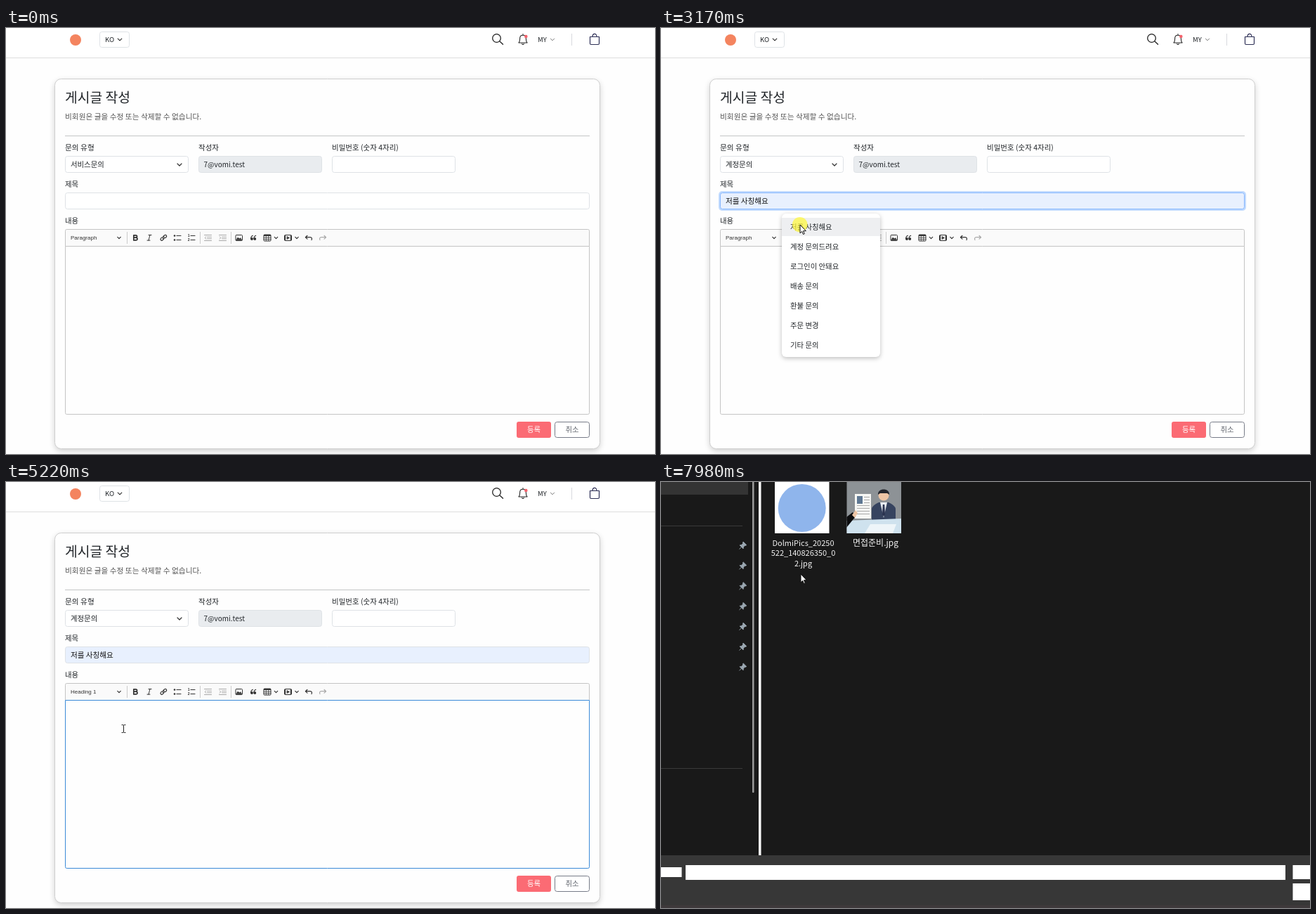
These frames come from a looping animation (924x606 px, 8000 ms). An HTML page with a canvas:

```html
<!DOCTYPE html>
<html lang="ko">
<head>
<meta charset="utf-8">
<title>게시글 작성</title>
<style>
html, body { margin: 0; width: 100%; height: 100%; overflow: hidden; background: #fefefe; }
canvas { display: block; }
</style>
</head>
<body>
<canvas id="stage" width="924" height="606"></canvas>
<script>
const c = document.getElementById('stage').getContext('2d');
const LOOP = 8000;
const KR = '"Noto Sans CJK KR", "Noto Sans CJK JP", "Noto Sans CJK", "Noto Sans", sans-serif';
const ARIAL = '"Liberation Sans", Arial, sans-serif';
const INK = '#212529', DARK = '#333', PALE = '#aaa', BORDER = '#dee2e6';

// Screen refreshes: start, end, count
const BEATS = [
  [390, 1160, 12], [1220, 1630, 7], [1890, 1890, 1], [2040, 2830, 12],
  [2900, 3030, 3], [3170, 3900, 11], [4030, 4750, 11], [4880, 5640, 11],
  [5690, 5970, 4], [6170, 6910, 11], [6980, 6980, 1], [7120, 7910, 11], [7980, 7980, 1]
];
// Pointer stops: time, x, y
const PATH = [
  [390, 886, 590], [1160, 213, 199], [1360, 213, 199], [1600, 190.5, 236],
  [2060, 190.5, 236], [2330, 188.5, 244.5], [2580, 188.5, 244.5], [2830, 196, 272],
  [3030, 198, 280], [3220, 198, 280], [3570, 141, 304], [4100, 141, 304],
  [4330, 138, 333], [4480, 138, 333], [4740, 167, 351], [6150, 167, 351],
  [6620, 340, 286], [6840, 331, 298], [7130, 331, 298], [7590, 327, 261],
  [7680, 327, 261], [7980, 199, 131]
];
const CLICKS = [[1220, 1360], [1890, 2060], [2400, 2600], [3170, 3280], [4030, 4130], [4440, 4540], [7120, 7260]];
const TYPED = ['ㄷ', '도', '동', '도오', '도와', '도왖', '도와주', '도와줏', '도와주세', '도와주셍', '도와주세요'];
const SUBJECT = '저를 사칭해요';

const clamp = v => Math.max(0, Math.min(1, v));
const within = (t, a, b) => t >= a && t < b;
const inBox = (p, x, y, w, h) => p.x >= x && p.x <= x + w && p.y >= y && p.y <= y + h;
const blink = (t, from) => Math.floor((t - from) / 530) % 2 === 0;
const fade = (t, on, off) => clamp((t - on) / 120 + .4) * clamp(1 - (t - off) / 150) * (t >= on);

function held(t) {
  let h = 0;
  for (const [a, b, n] of BEATS) {
    if (t < a) break;
    const d = n > 1 ? (b - a) / (n - 1) : 1;
    h = a + Math.min(n - 1, Math.floor((t - a + 25) / d)) * d;
  }
  return h;
}

function pointer(t) {
  const i = PATH.findIndex(k => k[0] > t);
  if (i < 0) return { x: PATH.at(-1)[1], y: PATH.at(-1)[2] };
  const a = PATH[Math.max(0, i - 1)], b = PATH[i];
  const u = clamp((t - a[0]) / (b[0] - a[0])), e = u * u * (3 - 2 * u);
  return { x: a[1] + (b[1] - a[1]) * e, y: a[2] + (b[2] - a[2]) * e };
}

function rect(x, y, w, h, fill) { c.fillStyle = fill; c.fillRect(x, y, w, h); }

function box(x, y, w, h, r, fill, stroke) {
  c.beginPath();
  c.roundRect(x, y, w, h, r);
  if (fill) { c.fillStyle = fill; c.fill(); }
  if (stroke) { c.strokeStyle = stroke; c.lineWidth = 1; c.stroke(); }
}

function dot(x, y, r, fill) {
  c.beginPath();
  c.arc(x, y, r, 0, 7);
  c.fillStyle = fill;
  c.fill();
}

function path(d, x, y, stroke, width = 1, fill) {
  const p = new Path2D(d);
  c.save();
  c.translate(x, y);
  c.lineCap = c.lineJoin = 'round';
  if (fill) { c.fillStyle = fill; c.fill(p); }
  if (stroke) { c.strokeStyle = stroke; c.lineWidth = width; c.stroke(p); }
  c.restore();
}

function text(s, x, mid, size, color = INK, { font = KR, weight = 400, align = 'left' } = {}) {
  c.font = `${weight} ${size}px ${font}`;
  c.textAlign = align;
  c.fillStyle = color;
  c.fillText(s, x, mid + size * .37);
}

const chevron = (x, y, r = 2.8, color = DARK, w = 1.2) =>
  path(`M${-r} ${-r / 2}L0 ${r / 2}L${r} ${-r / 2}`, x, y, color, w);

function shadowed(blur, dy, color, draw) {
  c.save();
  c.shadowBlur = blur;
  c.shadowOffsetY = dy;
  c.shadowColor = color;
  draw();
  c.restore();
}

function field(x, y, w, h, fill, focus) {
  if (focus > 0) {
    c.globalAlpha = focus;
    box(x - 2.5, y - 2.5, w + 5, h + 5, 5, '#c2dbfe');
    c.globalAlpha = 1;
  }
  box(x, y, w, h, 3, fill, focus > .5 ? '#86b7fe' : BORDER);
}

function header() {
  rect(0, 0, 924, 42, '#fff');
  rect(0, 42, 924, 1, '#dedede');
  dot(99, 17, 8, '#f4845f');
  box(133.5, 5.5, 42, 22, 3, '#fff', BORDER);
  text('KO', 141, 16.5, 9.6);
  chevron(162, 16.5);
  path('M5.8 0A5.8 5.8 0 1 1-5.8 0A5.8 5.8 0 1 1 5.8 0M4.2 4.2L9 8.8', 698.5, 14.5, '#222', 1.3);
  path('M-6 5C-4 3-4.5 0-4.3-2C-4-7 4-7 4.3-2C4.5 0 4 3 6 5ZM-1.5 6.5Q0 8.5 1.5 6.5M0-6V-7.5', 736, 16, '#222', 1.1);
  dot(740.3, 12, 2.3, '#f4626c');
  text('MY', 757, 16.5, 9.5);
  chevron(778, 16.5, 2.6, '#777', 1);
  rect(805, 8, 1, 17, '#d8dade');
  path('M-6.5-3.5H6.5V6Q6.5 7.5 5 7.5H-5Q-6.5 7.5-6.5 6ZM-3-3.5C-3-9 3-9 3-3.5', 838, 16, '#2f3157', 1.2);
}

const lines = (x, ys, from, to, color) =>
  path(ys.map(y => `M${from} ${y}H${to}`).join(''), x, 298.5, color, 1.1);

function toolbar(t, p) {
  box(84.5, 286.5, 746, 24, [2, 2, 0, 0], '#fafafa', '#c4c4c4');
  const open = within(t, 4080, 4500);
  if (open || inBox(p, 86, 289, 84, 20) && t < 5000) box(86, 289, 84, 19, 2, '#e4e4e4');
  text(t < 4500 ? 'Paragraph' : 'Heading 1', 92, 298.3, 8, DARK, { font: ARIAL });
  chevron(161, 298.5, 2.2);
  for (const x of [172, 276, 320]) rect(x, 290, 1, 17, '#ccc');
  if (within(t, 6980, 7400)) box(323, 289, 18, 18, 2, '#e4e4e4');

  path('M-2.2-3.5H.6C3.2-3.5 3.2-.2 .6-.2H-2.2M.6-.2C3.8-.2 3.8 3.6 .8 3.6H-2.2V-3.5', 184, 298.3, DARK, 1.7);
  path('M-1-3.8H3M-3 3.8H1M1-3.8L-1 3.8', 204, 298.3, DARK);
  path('M-.6 1.2C-2.2-.2 0-2.2 1-3.2C3.4-5.2 5.4-2.4 3.7-.8L2.4 .4M.6-1.2C2.2 .2 0 2.2-1 3.2C-3.4 5.2-5.4 2.4-3.7 .8L-2.4-.4', 224.3, 298.3, DARK, 1.2);
  lines(244, [-3, 3], -1, 5, DARK);
  dot(240, 295.5, 1.3, DARK);
  dot(240, 301.5, 1.3, DARK);
  lines(264, [-3, 3], -1, 5, DARK);
  text('1', 258.7, 295.3, 5, DARK, { font: ARIAL, weight: 700 });
  text('2', 258.7, 301.6, 5, DARK, { font: ARIAL, weight: 700 });
  for (const [x, s] of [[287.5, -1], [308.5, 1]]) {
    lines(x, [-4, 4], -5, 5, PALE);
    lines(x, [-1.3, 1.3], -1, 5, PALE);
    path(`M${-3.5 - s}-1.8L${-3.5 + s} 0L${-3.5 - s} 1.8`, x, 298.5, PALE);
  }
  box(327, 294.5, 9.5, 8, 1, null, DARK);
  path('M-4 3L-1.5-.5L.5 1.5L2 .2L4 3Z', 331.7, 298.5, DARK, .8, DARK);
  for (const x of [350, 354.3]) {
    dot(x, 300, 1.9, DARK);
    path('M-1.4 1C-1.5-1.5-.5-3 1.4-3.8', x, 299, DARK, 1.1);
  }
  box(367, 294, 10, 9, 1, null, DARK);
  rect(367, 294, 10, 2, DARK);
  path('M-5-.3H5M-5 2.2H5M-1.7-3V4M1.7-3V4', 372, 298.5, DARK, .8);
  chevron(384.5, 298.5, 2.2);
  box(396.5, 294.5, 10, 8, 1, null, DARK);
  path('M-4.2-3V3M4.2-3V3', 401.5, 298.5, DARK, 1.6);
  path('M-1.3-2L2 0L-1.3 2Z', 401.5, 298.5, DARK, .6, DARK);
  chevron(414, 298.5, 2.2);
  const bend = 'M-2-3.2L-4.6-.8L-2 1.6M-4.6-.8H2C4.6-.8 5 1.2 4 3';
  path(bend, 431, 298.5, DARK, 1.2);
  c.save();
  c.translate(451, 298.5);
  c.scale(-1, 1);
  path(bend, 0, 0, PALE, 1.2);
  c.restore();
}

function form(t, p) {
  shadowed(8, 3, 'rgba(0,0,0,.2)', () => box(69.5, 72.5, 776, 526, 9, '#fefefe'));
  box(69.5, 72.5, 776, 526, 9, '#fefefe', '#cfcfcf');
  text('게시글 작성', 84, 99, 19.3, INK, { weight: 500 });
  text('비회원은 글을 수정 또는 삭제할 수 없습니다.', 84, 126.5, 10.7, '#555');
  rect(84, 153, 747, 1, '#c4c5c6');
  text('문의 유형', 84, 170.5, 10.7);
  text('작성자', 274, 170.5, 10.5);
  text('비밀번호 (숫자 4자리)', 464, 170.5, 10.5);
  text('제목', 84, 222, 10.4);
  text('내용', 84, 274, 10.4);

  field(84.5, 182.5, 175, 23, '#fff', fade(t, 1360, 2540));
  text(t < 2060 ? '서비스문의' : '계정문의', 92, 194.5, 10.4);
  chevron(247, 194.5, 3);
  field(274.5, 182.5, 175, 23, '#e9ecef', 0);
  text('7@vomi.test', 281.5, 194.5, 10);
  field(464.5, 182.5, 175, 23, '#fff', 0);

  field(84.5, 234.5, 746, 23, t < 2830 ? '#fff' : '#e8f0fe', fade(t, 2540, 4030));
  if (t >= 2830) text(SUBJECT, 92, 246, 10.6, '#111');
  if (within(t, 2430, 2830) && blink(t, 2430)) rect(92, 240, 1, 13, '#000');
  if (within(t, 3240, 4030) && blink(t, 3240)) rect(153, 240, 1, 12, '#000');

  toolbar(t, p);
  const focused = within(t, 1220, 1350) || t >= 4560;
  box(84.5, 310.5, 746, 239, [0, 0, 2, 2], '#fefefe', focused ? '#3b8ad8' : '#c4c4c4');
  heading(t);

  box(727, 560, 49, 23, 3, '#fb6b74');
  text('등록', 751.5, 571.5, 10.4, '#fff', { align: 'center' });
  box(781.5, 560.5, 49, 22, 3, '#fff', '#777b88');
  text('취소', 806, 571.5, 10.4, '#62666f', { align: 'center' });
}

function heading(t) {
  if (t < 4560) return;
  let s = '';
  if (t >= 5260) s = TYPED[Math.min(TYPED.length - 1, Math.floor((t - 5260) / 38))];
  if (t >= 5880) s += '!';
  text(s, 92, 358, 48, INK, { weight: 500 });
  const w = s ? c.measureText(s).width : 0;
  const on = t < 5260 ? blink(t, 4560) : t < 5970 || blink(t, 5970);
  if (on) rect(92 + w, 326, 1.5, 63, '#222');
}

function popup(x, y, w, h, r = 2) {
  shadowed(6, 2, 'rgba(0,0,0,.25)', () => box(x, y, w, h, r, '#fff'));
}

function lists(t) {
  if (within(t, 1360, 2040)) {
    popup(84, 207, 176, 70);
    rect(84, t < 1560 ? 208 : 225, 176, 17, '#1e6fd9');
    ['서비스문의', '계정문의', '결제문의', '기타문의'].forEach((s, i) =>
      text(s, 92, 216.5 + i * 17, 10.4, i === (t < 1560 ? 0 : 1) ? '#fff' : INK));
  }
  if (within(t, 2560, 3230)) {
    popup(172, 264, 140, 204, 6);
    if (t >= 2800) rect(172, 270, 140, 26, '#eeeff1');
    [SUBJECT, '계정 문의드려요', '로그인이 안돼요', '배송 문의', '환불 문의', '주문 변경', '기타 문의'].forEach((s, i) =>
      text(s, 184, 283 + i * 28, 10.4));
  }
  if (within(t, 4080, 4500)) {
    popup(85, 309, 110, 96);
    if (t >= 4230) rect(85, 331, 110, 26, '#f0f0f0');
    [['Paragraph', 8, 320], ['Heading 1', 15, 344], ['Heading 2', 13, 369], ['Heading 3', 11, 392]].forEach(([s, size, y], i) =>
      text(s, 93, y, size, i ? DARK : '#2977ff', { font: ARIAL, weight: i ? 700 : 400 }));
  }
}

function files() {
  rect(0, 0, 924, 531, '#191919');
  rect(0, 0, 124, 18, '#343434');
  rect(0, 62, 116, 1, '#3a3a3a');
  rect(0, 407, 116, 1, '#3a3a3a');
  for (let i = 0; i < 7; i++) {
    c.save();
    c.translate(116, 91 + i * 28.8);
    c.rotate(Math.PI / 4);
    path('M-3-5H3V-3.8L2-3V0L3.5 2H-3.5L-2 0V-3L-3-3.8ZM0 2V6', 0, 0, '#9aa6b0', .9, '#9aa6b0');
    c.restore();
  }
  box(130, -5, 2.5, 447, 1, '#9b9b9b');
  rect(139, 0, 3.5, 531, '#fff');

  rect(162, 0, 77.5, 73, '#fff');
  dot(200.7, 37, 34, '#8fb5ec');

  c.save();
  c.beginPath();
  c.rect(264.5, 0, 77.5, 73);
  c.clip();
  rect(264, 0, 79, 73, '#8d9296');
  path('M-17 26V9Q-16 4-7 0H7Q16 4 17 9V26Z', 317, 29, null, 1, '#36435f');
  path('M-5 0L0 22L5 0Z', 317, 29, null, 1, '#e8edf2');
  path('M-1.2 3H1.2L2 17L0 20L-2 17Z', 317, 29, null, 1, '#2a3350');
  dot(317, 19, 7.5, '#eec5a5');
  path('M-8 0C-9-10 9-10 8 0L5-2H-5Z', 317, 18, null, 1, '#24262d');
  path('M0 0L80-3V25H0Z', 264, 55, null, 1, '#cfe2ee');
  path('M0 13L8 0H45L40 13Z', 290, 60, null, 1, '#eef5f9');
  rect(276, 17, 23, 35, '#f6f6f4');
  rect(279, 20, 8, 11, '#5f7893');
  for (let y = 21; y < 49; y += 4) rect(y < 32 ? 289 : 279, y, y < 32 ? 8 : 18, 1, '#aaa');
  path('M0 7L9 0L13 6L0 22Z', 264, 43, null, 1, '#0c0c0e');
  path('M0 4L5-3L8 1L4 8Z', 272, 43, null, 1, '#eec5a5');
  c.restore();

  ['DolmiPics_20250', '522_140826350_0', '2.jpg'].forEach((s, i) =>
    text(s, 202.5, 86.5 + i * 14.5, 11, '#f2f2f2', { align: 'center' }));
  text('면접준비.jpg', 305.5, 86.5, 12, '#f2f2f2', { align: 'center' });
}

function dialog(t) {
  if (t < 7570) return;
  const u = (t - 7594) / 79, s = Math.min(1, .92 + .0355 * u);
  c.save();
  c.globalAlpha = clamp(.5 + .5 * u);
  c.translate(416, 217);
  c.scale(s, s);
  c.translate(-416, -217);
  const g = c.createLinearGradient(0, 609, 0, 640);
  g.addColorStop(0, 'rgba(0,0,0,.48)');
  g.addColorStop(1, 'rgba(0,0,0,.24)');
  rect(-300, 609, 1500, 120, g);
  rect(-300, -300, 1500, 831, '#fefefe');
  rect(-300, 531, 1500, 78.5, '#373737');
  rect(-300, 548, 329.5, 14, '#fff');
  rect(35, 545, 854, 21, '#fff');
  rect(899.5, 545, 200, 20, '#fff');
  rect(899.5, 571, 200, 24, '#fff');
  c.restore();
  if (t >= 7980) {
    files();
    rect(0, 602, 924, 4, '#3e393b');
  }
}

function cursorKind(t, p) {
  if (t >= 7570 || within(t, 1360, 2040) || within(t, 2560, 3230) && p.y > 262) return 'arrow';
  if (within(t, 4080, 4500)) return 'hand';
  if (inBox(p, 85, 311, 745, 238) || inBox(p, 85, 235, 745, 22)) return 'beam';
  if (inBox(p, 86, 287, 375, 23)) return 'hand';
  return 'arrow';
}

function cursor(t, p) {
  if (t < 390) return;
  if (CLICKS.some(([a, b]) => within(t, a, b))) dot(p.x - .3, p.y - .3, 10.8, 'rgba(255,247,60,.72)');
  const kind = cursorKind(t, p);
  if (kind === 'beam') {
    path('M-2.5-5.5H-1Q0-5.5 0-4.5Q0-5.5 1-5.5H2.5M0-4.5V4.5M-2.5 5.5H-1Q0 5.5 0 4.5Q0 5.5 1 5.5H2.5', p.x + .5, p.y, '#222', 1);
  } else if (kind === 'hand') {
    path('M0 1.5a1.2 1.2 0 0 1 2.4 0v5v-1a1.1 1.1 0 0 1 2.2 .3v1v-.7a1.1 1.1 0 0 1 2.1 .6v1v-.5a1 1 0 0 1 1.8 .8v4c0 2-1 2.5-1 4.3h-6c0-1.6-2.4-3.6-3.9-6.2c-.8-1.6 .8-2.4 1.8-1.2l.6 .8z', p.x - 1.2, p.y - .5, '#111', 1, '#fff');
  } else {
    path('M0 0V11.5L2.7 9.1L4.5 13.2L6.3 12.4L4.5 8.4H8Z', p.x, p.y + .3, '#111', 1, '#fff');
  }
}

function draw(now) {
  const t = held(now % LOOP), p = pointer(t);
  rect(0, 0, 924, 606, '#fefefe');
  header();
  form(t, p);
  lists(t);
  dialog(t);
  cursor(t, p);
}

const start = performance.now();
function tick() {
  draw(performance.now() - start);
  requestAnimationFrame(tick);
}
tick();
</script>
</body>
</html>
```
